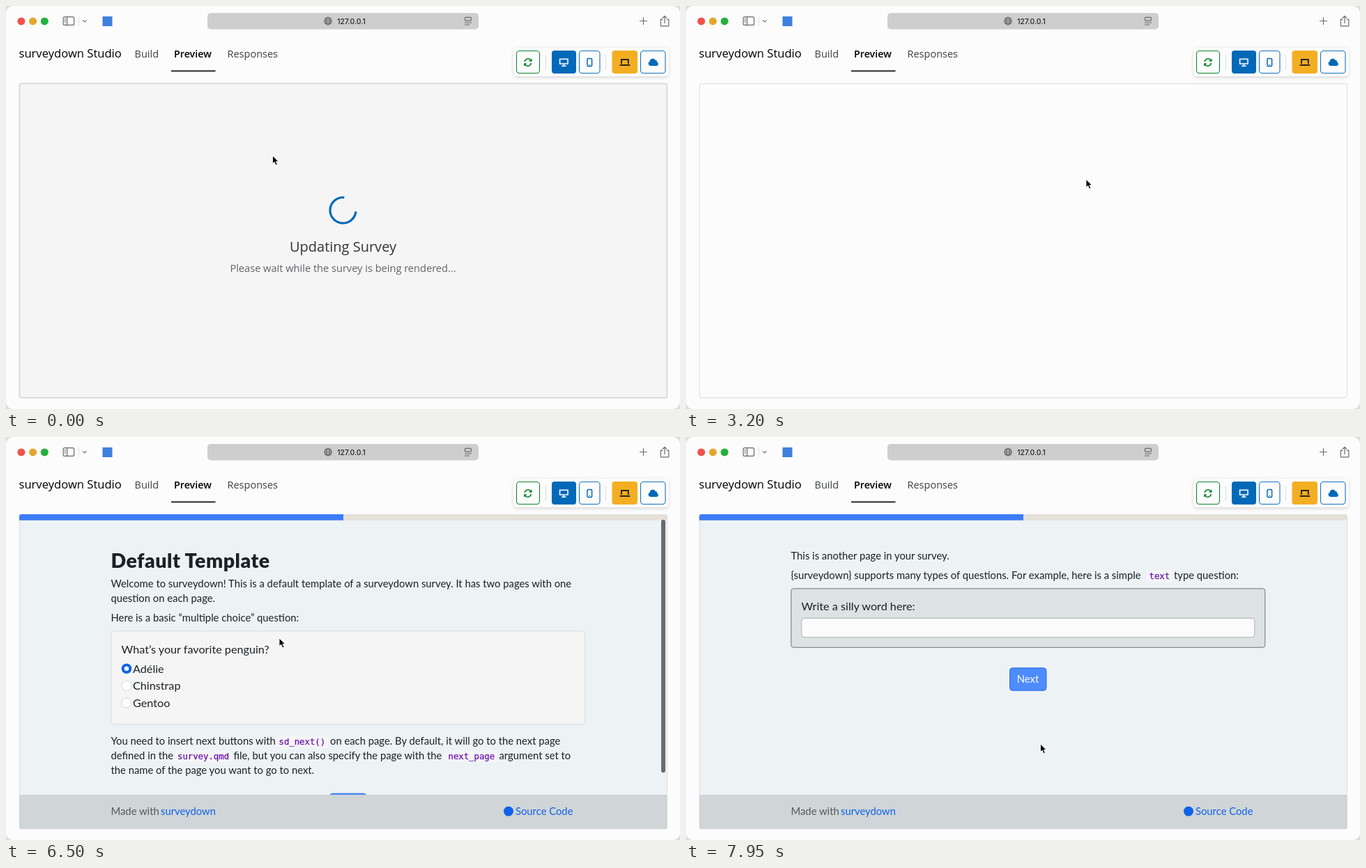
An HTML page that plays this animation: 967x579 px, repeating every 8 s.

```html
<!DOCTYPE html>
<html lang="en">
<head>
<meta charset="utf-8">
<title>Survey preview</title>
<style>
  html, body { margin: 0; width: 100%; height: 100%; overflow: hidden; background: #dcdcdc; }
  svg { display: block; width: 100%; height: 100%; }
  text { white-space: pre; }
  .ui { font-family: "Open Sans", sans-serif; font-size: 14.5px; fill: #3c3f42; }
  .url { font: 500 10.4px Inter, sans-serif; fill: #222; }
  .body { font-family: Lato, sans-serif; font-size: 14.8px; fill: #1c2125; }
  .body .ask { font-size: 16.2px; }
  .body .title { font-size: 28.5px; font-weight: 900; letter-spacing: .5px; }
  .body .code { font-family: "DejaVu Sans Mono", monospace; font-size: 12.3px; fill: #6a11a8; stroke: #6a11a8; stroke-width: .25; }
  .link { fill: #0f62ec; }
  .mid { text-anchor: middle; }
  .line { fill: none; stroke: #6b6b6b; stroke-width: 1.2; stroke-linecap: round; stroke-linejoin: round; }
  .open { fill: #dde2e4; stroke: #6d7377; }
  .done { fill: #f5f5f5; stroke: #d8dbdd; }
</style>
</head>
<body>
<svg viewBox="0 0 967 579">
  <defs>
    <clipPath id="panelClip"><rect x="19" y="111" width="929.5" height="452.5" rx="3"/></clipPath>
    <filter id="shadow" x="-10%" y="-30%" width="120%" height="170%">
      <feDropShadow dx="0" dy="1.5" stdDeviation="2.5" flood-opacity=".16"/>
    </filter>
  </defs>
  <rect width="967" height="579" rx="10" fill="#fcfcfc"/>

  <!-- Browser bar -->
  <circle cx="21.9" cy="21.9" r="5.5" fill="#f0524d"/>
  <circle cx="38.6" cy="21.9" r="5.5" fill="#e3a62f"/>
  <circle cx="55.3" cy="21.9" r="5.5" fill="#25b03d"/>
  <g class="line">
    <rect x="82.2" y="15.6" width="15.4" height="11.8" rx="2"/>
    <path d="M87.6 15.6V27.4M84.3 18.5h1.2M84.3 20.8h1.2M84.3 23h1.2M110.4 20.6l2.4 2.3 2.4-2.3"/>
    <path d="M104.5 15v13" stroke="#e6e6e6"/>
    <path d="M909.5 21.5h10M914.5 16.5v10"/>
    <path d="M942 19.2h-2.6v9.6h11.4v-9.6h-2.6M945 24.5v-9.8M942.4 17l2.6-2.6 2.6 2.6"/>
  </g>
  <rect x="138.5" y="15" width="14" height="14" fill="#3f7fdc"/>
  <rect x="289" y="10" width="389" height="23.5" rx="5" fill="#cecece"/>
  <g class="line" stroke-width="1">
    <circle cx="462" cy="21.6" r="5.2"/><ellipse cx="462" cy="21.6" rx="2.4" ry="5.2"/>
    <path d="M456.8 21.6h10.4M457.8 18.8h8.4M457.8 24.4h8.4"/>
    <rect x="658.5" y="16.3" width="9" height="4.8" rx="1"/>
    <path d="M658.5 24h9M658.5 27h6"/>
  </g>
  <text class="url mid" x="495.5" y="25.8">127.0.0.1</text>

  <!-- Studio navigation -->
  <g class="ui">
    <text x="18.5" y="74.3" style="font-size:16.6px;fill:#000">surveydown Studio</text>
    <text x="184.5" y="73.5">Build</text>
    <text x="241" y="73.5" style="font-size:14.3px;font-weight:600;fill:#000">Preview</text>
    <text x="317.5" y="73.5">Responses</text>
  </g>
  <path d="M237 93.4h63.5" stroke="#111" stroke-width="1.6"/>

  <!-- Toolbar -->
  <rect x="728.5" y="60" width="222" height="41" rx="5" fill="#fcfcfc" filter="url(#shadow)"/>
  <path d="M774.5 70v22M860.5 70v22" stroke="#dedede"/>
  <rect x="783" y="64" width="35" height="33" rx="4" fill="#0169b8"/>
  <rect x="869.5" y="64" width="36.5" height="33" rx="4" fill="#f3ae22"/>
  <g fill="none" stroke="#1673bd" stroke-width="1.1">
    <rect x="732.5" y="64.5" width="33" height="32" rx="4" stroke="#12852f"/>
    <rect x="822.5" y="64.5" width="29.5" height="32" rx="4"/>
    <rect x="910.5" y="64.5" width="35.5" height="32" rx="4"/>
  </g>
  <g fill="none" stroke="#12852f" stroke-width="1.7">
    <path d="M744.2 80a4.8 4.8 0 0 1 8.6-2.3M753.4 82a4.8 4.8 0 0 1-8.6 2.3"/>
    <path d="M754.6 75.2v4.6h-4.6zM743 86.8v-4.6h4.6z" fill="#12852f" stroke="none"/>
  </g>
  <path d="M794.6 76.2h11.4v6.8h-11.4zM800.3 83v3M797 86.2h6.6" fill="none" stroke="#fff" stroke-width="1.6"/>
  <rect x="834" y="75.6" width="6.6" height="10.8" rx="1.2" fill="none" stroke="#0169b8" stroke-width="1.5"/>
  <path d="M836.3 84.4h2" stroke="#0169b8"/>
  <path d="M883 83v-6.2h9.8V83M880.6 84.9h14.6" fill="none" stroke="#111" stroke-width="1.7"/>
  <path d="M924.5 86a3.4 3.4 0 0 1-.9-6.5 4.3 4.3 0 0 1 8-1.8 2.9 2.9 0 0 1 2.6 3.1 2.7 2.7 0 0 1-1 5.2z" fill="#0169b8"/>

  <!-- Preview panel -->
  <rect id="panel" x="19.4" y="111.4" width="929" height="451.5" rx="3"/>
  <g id="loading" class="ui">
    <circle id="spinner" cx="483.5" cy="293.5" r="18.5" fill="none" stroke="#0169b8" stroke-width="3.2"
            pathLength="360" stroke-dasharray="270 90"/>
    <text class="mid" x="483.5" y="352.6" style="font-size:20px;fill:#333">Updating Survey</text>
    <text class="mid" x="483.5" y="381.8" style="font-size:14.6px;fill:#606264">Please wait while the survey is being rendered...</text>
  </g>

  <g id="survey" class="body" clip-path="url(#panelClip)">
    <rect class="fixed" x="20" y="111" width="928" height="452" fill="#edf2f5"/>
    <g id="page1"></g>
    <g id="page2"></g>
    <g class="fixed">
      <rect x="19" y="111" width="930" height="8.7" fill="#e5e0d8"/>
      <rect id="progress" x="19" y="111" height="8.7" fill="#3d7cf8"/>
      <rect x="19" y="514" width="930" height="49.5" fill="#d0d5d7"/>
      <text x="150.5" y="543" fill="#54595d">Made with</text>
      <text class="link" x="222" y="543">surveydown</text>
      <circle class="link" cx="721" cy="537.7" r="7"/>
      <text class="link" x="731" y="543">Source Code</text>
    </g>
    <rect id="thumb" x="940" width="6" height="363.5" rx="3" fill="#666b6e"/>
  </g>

  <path id="cursor" d="M0 0V11.6L2.7 9.2 4.7 13.8 6.9 12.8 4.9 8.4H8.4Z" fill="#000" stroke="#fff" stroke-width=".9"/>
</svg>
<script>
const LOOP = 8000;
const SPINNER_END = 2350, SURVEY_START = 3300, ANSWER = 4950, NEXT_PAGE = 7550;
const MAX_SCROLL = 103.5;
const $ = id => document.getElementById(id);

const text = (x, y, s, cls = "") => `<text class="${cls}" x="${x}" y="${y}">${s}</text>`;
const box = (y, h, attrs) => `<rect x="150.8" y="${y}" width="680" height="${h}" rx="3.5" ${attrs}/>`;
const code = (x, y, s) =>
  `<rect x="${x - 4}" y="${y - 13}" width="${s.length * 7.4 + 8}" height="17" rx="3" fill="#f4f5f7"/>` + text(x, y, s, "code");
const button = y =>
  `<rect x="464.5" y="${y}" width="52.5" height="32.5" rx="4" fill="#4e8bfc" stroke="#2e6fe2"/>` +
  `<text class="mid" x="490.5" y="${y + 21.5}" fill="#fff">Next</text>`;
const radio = (y, label, id) =>
  `<circle id="${id}" cx="173" cy="${y}" r="7.2" fill="#fdfdfd" stroke="#d3d8db"/>` + text(182, y + 5.8, label, "ask");

$("page1").innerHTML =
  text(150.5, 194.5, "Default Template", "title") +
  text(150.5, 223, "Welcome to surveydown! This is a default template of a surveydown survey. It has two pages with one") +
  text(150.5, 244, "question on each page.") +
  text(150.5, 272, "Here is a basic “multiple choice” question:") +
  box(285.3, 134, 'id="question"') +
  text(165.5, 317.3, "What’s your favorite penguin?", "ask") +
  radio(339.3, "Adélie", "choice") + radio(364, "Chinstrap", "choice2") + radio(388.3, "Gentoo", "choice3") +
  text(150.5, 449, "You need to insert next buttons with") + code(391.5, 449, "sd_next()") +
  text(465, 449, "on each page. By default, it will go to the next page") +
  text(150.5, 470, "defined in the") + code(246, 470, "survey.qmd") +
  text(326.5, 470, "file, but you can also specify the page with the") + code(634.5, 470, "next_page") +
  text(707.5, 470, "argument set to") +
  text(150.5, 491, "the name of the page you want to go to next.") +
  button(518.7);

$("page2").innerHTML =
  text(150.5, 176, "This is another page in your survey.") +
  text(150.5, 204, "{surveydown} supports many types of questions. For example, here is a simple") +
  code(664.5, 204, "text") + text(700, 204, "type question:") +
  box(217.8, 84.5, 'class="open"') +
  text(165.5, 249.3, "Write a silly word here:", "ask") +
  '<rect x="165.8" y="260.3" width="650" height="27.5" rx="4" fill="#fcfcfc" stroke="#a9afb2"/>' +
  button(331.8);

// Keys are [time, ...values]; returns the values at time t.
const linear = k => k;
const smooth = k => k * k * (3 - 2 * k);
function track(keys, t, ease) {
  const i = keys.findIndex(key => key[0] > t);
  if (i === 0) return keys[0].slice(1);
  if (i < 0) return keys.at(-1).slice(1);
  const [a, b] = [keys[i - 1], keys[i]];
  const k = ease((t - a[0]) / (b[0] - a[0]));
  return a.slice(1).map((v, n) => v + (b[n + 1] - v) * k);
}

const pointer = [
  [0, 382.5, 215], [750, 574, 249], [3400, 574, 249], [3850, 354, 299], [4050, 354, 299],
  [4250, 350, 298], [4800, 171, 335], [5250, 171, 335], [6000, 392, 289],
  [6850, 392, 289], [7300, 488, 428], [7550, 488, 428], [7900, 508.5, 441]
];
const scrolling = [[6400, 0], [6500, 6], [6650, 84], [6750, 107], [6850, 107], [7050, MAX_SCROLL]];
const filling = [[ANSWER, 0], [ANSWER + 500, 465]];

const show = (id, on) => $(id).setAttribute("display", on ? "inline" : "none");
const set = (id, attrs) => Object.entries(attrs).forEach(([k, v]) => $(id).setAttribute(k, v));

function render(t) {
  const loading = t < SPINNER_END, answered = t >= ANSWER, second = t >= NEXT_PAGE;
  const scroll = second ? 0 : track(scrolling, t, linear)[0];
  const bounce = Math.max(0, scroll - MAX_SCROLL);

  show("loading", loading);
  show("survey", t >= SURVEY_START);
  show("page1", !second);
  show("page2", second);
  show("thumb", scroll > 0);

  set("panel", loading
    ? { fill: "#f5f5f6", stroke: "#d6d7d8", "stroke-width": 1.7 }
    : { fill: "#fcfcfc", stroke: "#dcdcdc", "stroke-width": 1 });
  set("spinner", { transform: `rotate(${5 + t * 0.48} 483.5 293.5)` });
  set("question", { class: answered ? "done" : "open" });
  set("choice", answered
    ? { r: 5.3, stroke: "#1263ea", "stroke-width": 4 }
    : { r: 7.2, stroke: "#d3d8db", "stroke-width": 1 });
  set("progress", { width: track(filling, t, smooth)[0] });
  set("page1", { transform: `translate(0 ${-scroll})` });
  document.querySelectorAll(".fixed").forEach(el => el.setAttribute("transform", `translate(0 ${-bounce})`));
  set("thumb", { y: 113.5 + 84 * Math.min(1, scroll / MAX_SCROLL) });
  set("cursor", { transform: `translate(${track(pointer, t, smooth)})` });
}

const start = performance.now();
(function frame() {
  render((performance.now() - start) % LOOP);
  requestAnimationFrame(frame);
})();
</script>
</body>
</html>
```
